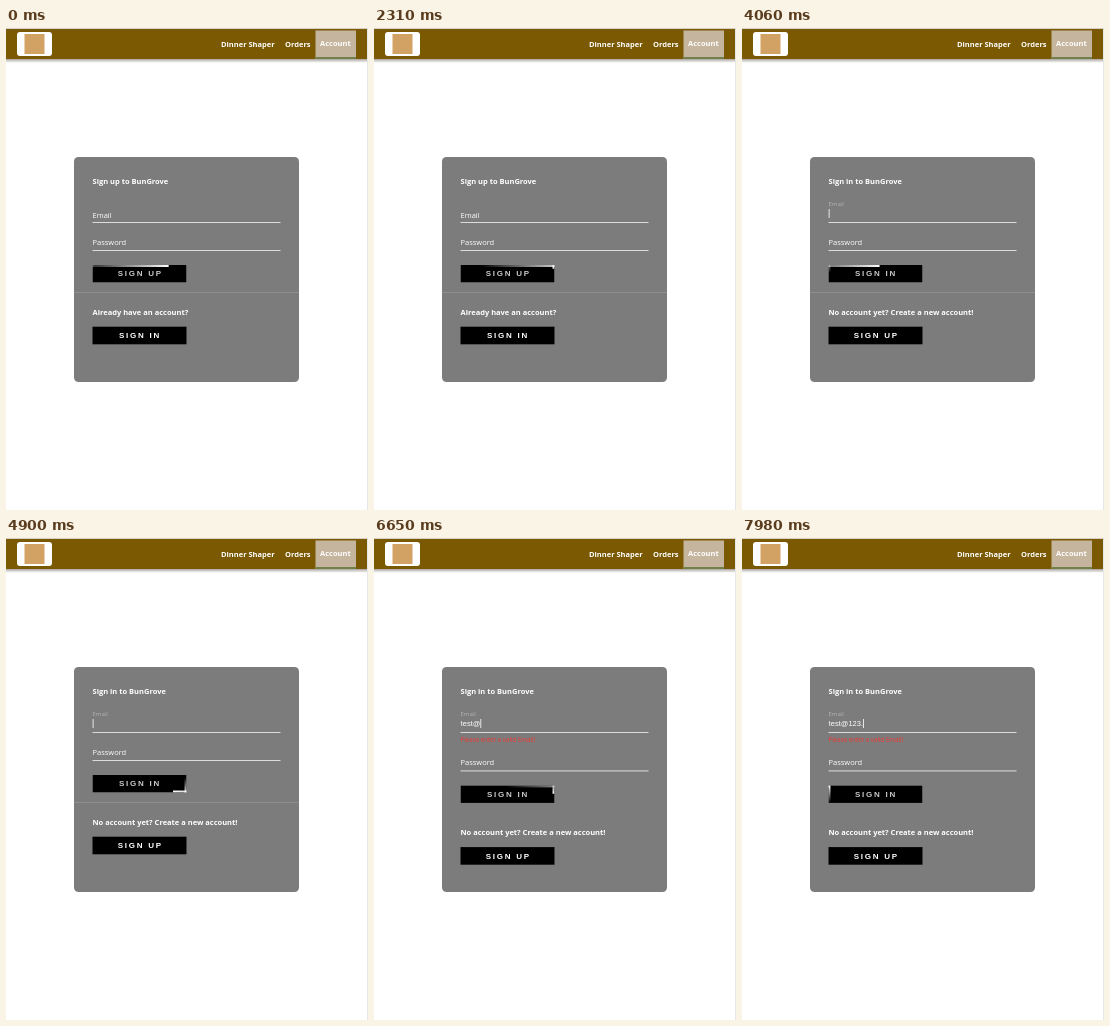
Recreate the animation shown at these times as an HTML page. Size 362 by 482 pixels, loop 8 s.

```html
<!DOCTYPE html>
<html lang="en">
<head>
<meta charset="utf-8">
<title>Sign in form</title>
<style>
  html, body { margin: 0; width: 100%; height: 100%; overflow: hidden; background: #fff; }
  svg { display: block; width: 100vw; height: 100vh; }
  text { font: 7.5px "Open Sans", sans-serif; fill: #fff; white-space: pre; }
  .bold { font-weight: 700; }
  .caps { font: 700 8px "Liberation Sans", Arial, sans-serif; letter-spacing: 1.75px; }
  .typed { font-family: "Liberation Sans", Arial, sans-serif; }
  .small { font-size: 6px; fill: #b4b4b4; }
  .error { font-size: 6.2px; fill: #ee3a34; }
  .muted { fill: #cacaca; }
</style>
</head>
<body>
<svg viewBox="0 0 362 482" preserveAspectRatio="none">
  <defs>
    <linearGradient id="shade" x2="0" y2="1">
      <stop stop-color="#8c8478" stop-opacity=".75"/><stop offset="1" stop-color="#999" stop-opacity="0"/>
    </linearGradient>
    <linearGradient id="glow"><stop stop-color="#fff" stop-opacity="0"/><stop offset="1" stop-color="#fff"/></linearGradient>
    <linearGradient id="glow0" href="#glow" x1="0" x2="1"/>
    <linearGradient id="glow1" href="#glow" x1="0" x2="0" y1="0" y2="1"/>
    <linearGradient id="glow2" href="#glow" x1="1" x2="0"/>
    <linearGradient id="glow3" href="#glow" x1="0" x2="0" y1="1" y2="0"/>
    <clipPath id="buttonClip"><rect width="94" height="17.5"/></clipPath>
  </defs>

  <rect y="31" width="361" height="4" fill="url(#shade)"/>
  <rect y="1" width="361" height="30" fill="#7a5902"/>
  <rect x="361" width="1" height="482" fill="#e6e6e6"/>
  <rect width="362" height="1" fill="#d5d0c6"/>
  <rect x="11" y="4" width="35" height="24" rx="3" fill="#fff"/>
  <rect x="18.5" y="6" width="20" height="20" fill="#d2a265"/>
  <text class="bold" x="215" y="19">Dinner Shaper</text>
  <text class="bold" x="279" y="19">Orders</text>
  <rect x="309.5" y="2.5" width="40.5" height="28.5" fill="#c5b59e"/>
  <rect x="309.5" y="29" width="40.5" height="2" fill="#71804a"/>
  <text class="bold" x="314" y="18">Account</text>

  <rect x="68" y="129" width="225" height="225" rx="4.5" fill="#7c7c7c"/>
  <text class="bold" id="title" x="86.5" y="155.7"></text>
  <text id="placeholder" x="86.5" y="189.7">Email</text>
  <g id="field">
    <text class="small" x="86.5" y="178">Email</text>
    <text class="typed" id="typed" x="86.7" y="188"></text>
    <rect id="caret" y="181" width=".8" height="9" fill="#fff"/>
  </g>
  <rect x="86.5" y="194" width="188" height="1" fill="#dcdcdc"/>
  <text class="error" id="error" x="86.5" y="203.5">Please enter a valid Email!</text>

  <g id="lower">
    <text x="86.5" y="217">Password</text>
    <rect x="86.5" y="222" width="188" height="1" fill="#dcdcdc"/>
    <g transform="translate(86.5 237)" clip-path="url(#buttonClip)">
      <rect width="94" height="17.5"/>
      <g id="lights">
        <rect width="94" height="2" fill="url(#glow0)"/>
        <rect x="92" width="2" height="17.5" fill="url(#glow1)"/>
        <rect y="15.5" width="94" height="2" fill="url(#glow2)"/>
        <rect width="2" height="17.5" fill="url(#glow3)"/>
      </g>
    </g>
    <text class="caps muted" id="submit" y="248.2"></text>
    <rect id="divider" x="68" y="264" width="225" height="1" fill="#8d8d8d"/>
    <text class="bold" id="question" x="86.5" y="287"></text>
    <rect x="86.5" y="298.7" width="94" height="17.6"/>
    <rect id="focusRing" x="86.2" y="298.2" width="94.8" height="18.4" rx="1.5" fill="none" stroke="#f3d3a4" stroke-width="1.5"/>
    <text class="caps" id="toggle" y="310.2"></text>
  </g>
</svg>
<script>
  const LOOP = 8000, STEP = 70, LIGHT_PERIOD = 2100, LIGHT_START = 0.2025;
  const SWITCH = 2940, FOCUS = 3850, BLINK = 525;
  const EMAIL = "test@123.";
  const KEY_TIMES = [5250, 5390, 5530, 5670, 6300, 6790, 6930, 7070, 7770];
  const el = id => document.getElementById(id);
  const show = (id, on) => el(id).setAttribute("visibility", on ? "inherit" : "hidden");
  const setText = (id, value) => { if (el(id).textContent !== value) el(id).textContent = value; };

  function setCaps(id, isSignUp) {
    setText(id, isSignUp ? "SIGN UP" : "SIGN IN");
    el(id).setAttribute("x", isSignUp ? 111.7 : 113);
  }

  // Each light crosses its edge in half a period, a quarter after the previous one.
  function moveLights(t) {
    [...el("lights").children].forEach((light, i) => {
      const phase = (t / LIGHT_PERIOD + LIGHT_START - i / 4 + 1) % 1;
      const shift = (Math.min(phase * 4, 2) - 1) * (i < 2 ? 1 : -1);
      const [x, y] = i % 2 ? [0, shift * 17.5] : [shift * 94, 0];
      light.setAttribute("transform", `translate(${x} ${y})`);
    });
  }

  function render(t) {
    const signUp = t < SWITCH, focused = t >= FOCUS;
    const count = KEY_TIMES.filter(k => k <= t).length;
    const email = EMAIL.slice(0, count);
    const invalid = count > 0 && !/@\w+$/.test(email);
    const ring = !signUp && !focused;

    setText("title", `Sign ${signUp ? "up" : "in"} to BunGrove`);
    setText("question", signUp ? "Already have an account?" : "No account yet? Create a new account!");
    setCaps("submit", signUp);
    setCaps("toggle", !signUp);
    el("toggle").setAttribute("fill-opacity", ring ? 0.85 : 1);

    setText("typed", email);
    const lastInput = count ? KEY_TIMES[count - 1] : FOCUS;
    el("caret").setAttribute("x", 86.7 + (count ? el("typed").getComputedTextLength() : 0));
    show("field", focused);
    show("placeholder", !focused);
    show("caret", focused && Math.floor((t - lastInput) / BLINK) % 2 === 0);
    show("error", invalid);
    show("focusRing", ring);
    show("divider", !ring && !invalid);
    el("lower").setAttribute("transform", `translate(0 ${invalid ? 10.4 : 0})`);
    moveLights(t);
  }

  const start = performance.now();
  function tick() {
    const t = (performance.now() - start) % LOOP;
    render(Math.floor(t / STEP) * STEP);
    requestAnimationFrame(tick);
  }
  tick();
</script>
</body>
</html>
```
